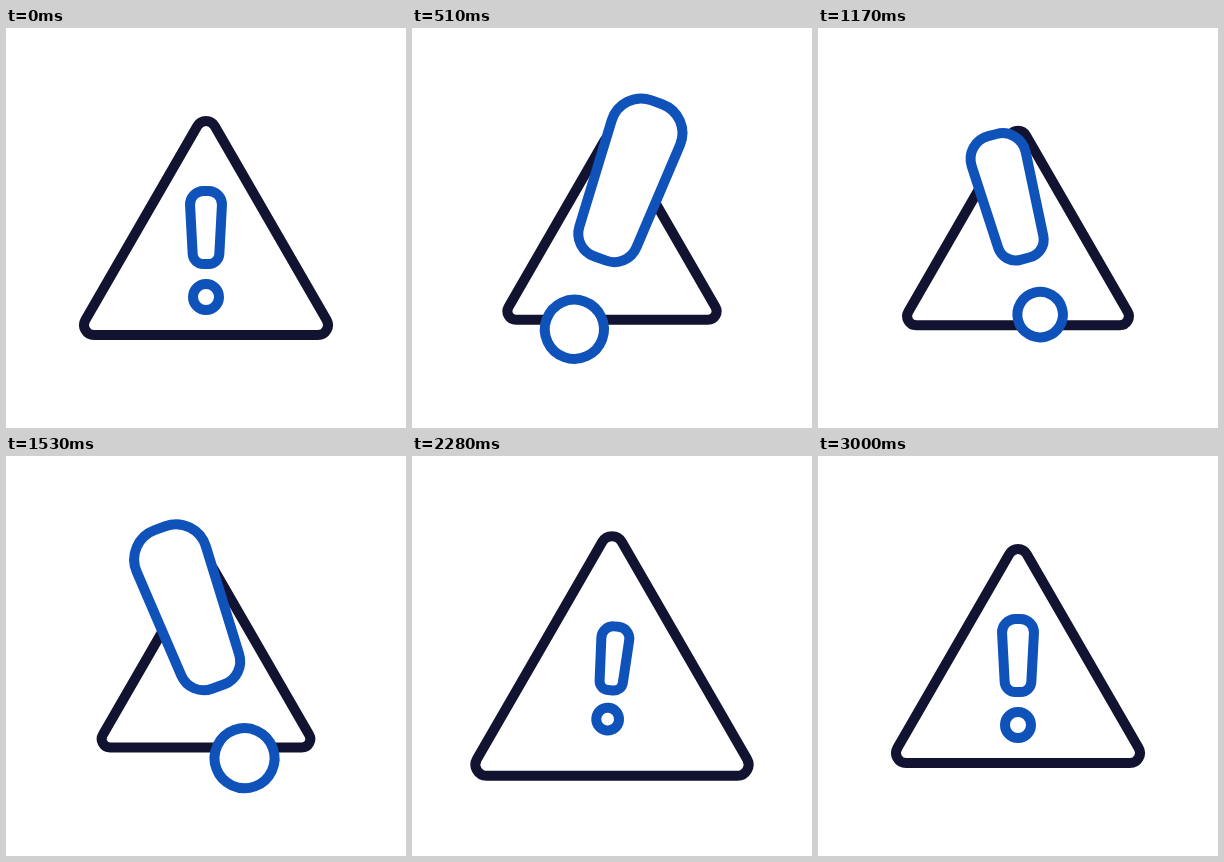
An HTML page with a canvas for the animation above (5030 ms loop, 400 by 400 pixels).

```html
<!DOCTYPE html>
<html lang="en">
<head>
<meta charset="utf-8">
<title>Warning sign</title>
<style>
  html, body { margin: 0; width: 100%; height: 100%; overflow: hidden; background: #fff; }
  canvas { display: block; width: 400px; height: 400px; }
</style>
</head>
<body>
<canvas id="stage" width="400" height="400"></canvas>
<script>
const ctx = document.getElementById('stage').getContext('2d');
const LOOP = 5030, ACTIVE = 3000, STEP = 30;
const DARK = '#121331', BLUE = '#0f52ba';

// Turning points as [time in ms, value]: swing right, swing left, overshoot, rest.
const SMALL = .855, BIG = 2.31, SWING = 20.2;
const signKeys = [[0, 1], [430, SMALL], [940, .94], [1470, SMALL], [1720, SMALL], [2200, 1.123], [2700, 1]];
const sizeKeys = [[0, 1], [430, BIG], [905, 1.32], [1470, BIG], [1580, BIG], [2220, .875], [2760, 1]];
const tiltKeys = [[0, 0], [430, SWING], [1470, -SWING], [1580, -SWING], [2320, 5.5], [2800, 0]];

function easeInOut(p) {
  const a = p ** 2.1, b = (1 - p) ** 2.1;
  return a / (a + b);
}

function sample(keys, t) {
  const i = keys.findIndex(key => key[0] > t);
  if (i < 0) return keys[keys.length - 1][1];
  const [t0, v0] = keys[i - 1], [t1, v1] = keys[i];
  return v0 + (v1 - v0) * easeInOut((t - t0) / (t1 - t0));
}

// Corners are [x, y, radius], all multiplied by k.
function roundedShape(corners, k) {
  const points = corners.map(c => c.map(v => v * k));
  const [a] = points, z = points[points.length - 1];
  ctx.beginPath();
  ctx.moveTo((a[0] + z[0]) / 2, (a[1] + z[1]) / 2);
  points.forEach(([x, y, r], i) => {
    const [nx, ny] = points[(i + 1) % points.length];
    ctx.arcTo(x, y, nx, ny, r);
  });
  ctx.closePath();
}

function paint(color) {
  ctx.fillStyle = '#fff';
  ctx.strokeStyle = color;
  ctx.lineWidth = 10;
  ctx.fill();
  ctx.stroke();
}

const SIGN = [[0, -117, 10], [129.3, 107, 10], [-129.3, 107, 10]];
const BAR = [[-16.7, -36.5, 13.5], [16.7, -36.5, 13.5], [12.8, 36.5, 10.5], [-12.8, 36.5, 10.5]];

function drawSign(scale) {
  ctx.save();
  ctx.translate(200, 200);
  roundedShape(SIGN, scale);
  paint(DARK);
  ctx.restore();
}

function drawMark(size, tilt) {
  // The mark rises as it grows and leans back a little against its tilt.
  const rise = 17 * Math.max(0, size - 1) ** .65;
  ctx.save();
  ctx.translate(200 - .1 * tilt, 223.2 - rise);
  ctx.rotate(tilt * Math.PI / 180);
  ctx.translate(0, -23.8 * size);
  roundedShape(BAR, size);
  paint(BLUE);
  ctx.beginPath();
  ctx.arc(0, 69.6 * size, 13 * size, 0, 2 * Math.PI);
  paint(BLUE);
  ctx.restore();
}

function draw(t) {
  ctx.fillStyle = '#fff';
  ctx.fillRect(0, 0, 400, 400);
  drawSign(sample(signKeys, t));
  drawMark(sample(sizeKeys, t), sample(tiltKeys, t));
}

const start = performance.now();
function tick() {
  const t = Math.max(0, performance.now() - start) % LOOP;
  draw(Math.min(ACTIVE, Math.floor(t / STEP) * STEP));
  requestAnimationFrame(tick);
}
tick();
</script>
</body>
</html>
```
